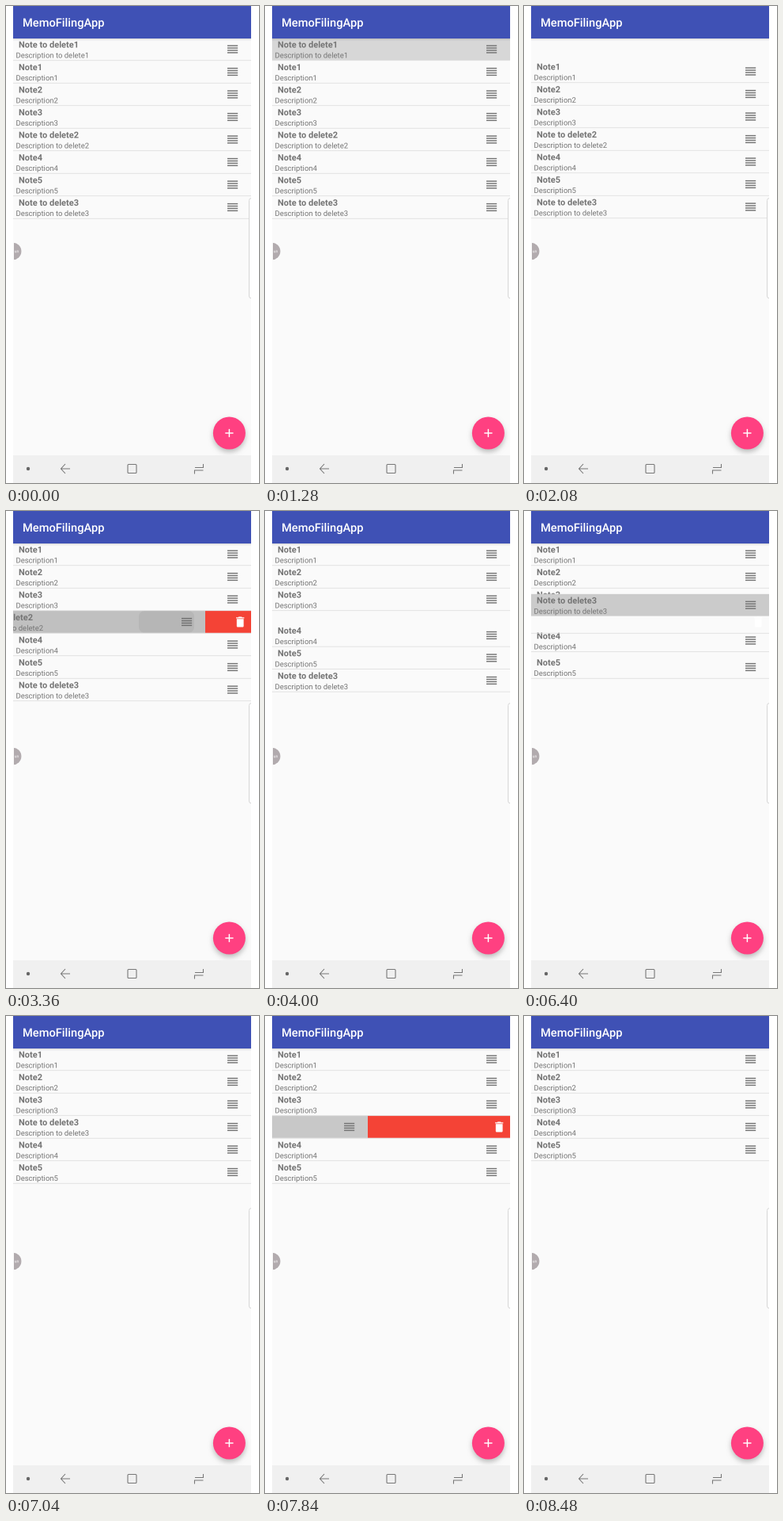
An HTML page with a canvas for the animation above (9.6 s loop, 320x602 px).

```html
<!DOCTYPE html>
<html lang="en">
<head>
<meta charset="utf-8">
<title>Note list</title>
<style>
html, body { margin: 0; width: 100%; height: 100%; overflow: hidden; background: #fff; }
canvas { display: block; width: 320px; height: 602px; }
</style>
</head>
<body>
<canvas id="stage"></canvas>
<script>
const W = 320, H = 602, LOOP = 9600, STEP = 160;
const LEFT = 9, RIGHT = 310, BAR = 41, TOP = 40.6, ROW = 28.5, DP = 0.7324;
const GRAY = '#757575', LINE = '#dadada', PAPER = '#fafafa';

const canvas = document.getElementById('stage');
const ctx = canvas.getContext('2d');
const dpr = window.devicePixelRatio || 1;
canvas.width = W * dpr;
canvas.height = H * dpr;
ctx.textRendering = 'geometricPrecision';

const trash = new Path2D('M6 19c0 1.1.9 2 2 2h8c1.1 0 2-.9 2-2V7H6zM19 4h-3.5l-1-1h-5l-1 1H5v2h14z');
const navIcons = new Path2D('M81 584H69.5M75 578L69.5 584L75 590' +
  'M155 578.5H164Q165 578.5 165 579.5V588.5Q165 589.5 164 589.5H155Q154 589.5 154 588.5V579.5Q154 578.5 155 578.5Z' +
  'M249.5 578V582.5H239M238.5 590.5V586H249.5');

// Linear interpolation through [time, value] pairs
function track(t, keys) {
  if (t <= keys[0][0]) return keys[0][1];
  for (let i = 1; i < keys.length; i++) {
    const [t0, a] = keys[i - 1], [t1, b] = keys[i];
    if (t < t1) return a + (b - a) * (t - t0) / (t1 - t0);
  }
  return keys[keys.length - 1][1];
}

// Accelerate-decelerate progress
function ease(t, start, length = 250) {
  const p = Math.min(1, Math.max(0, (t - start) / length));
  return (1 - Math.cos(Math.PI * p)) / 2;
}

const removals = {
  1: { press: 1120, gone: 1920, close: 2059,
       shade: [[1120, .03], [1280, .14], [1440, .2]],
       slide: [[1280, 0], [1440, 22], [1600, 75], [1760, 185], [1920, 301]] },
  2: { press: 3360, gone: 3680, close: 3890,
       shade: [[3360, .23]],
       slide: [[3360, 58], [3520, 205], [3680, 301]], ripple: true },
  3: { press: 7520, gone: 8000, close: 8200,
       shade: [[7520, .06], [7680, .2]],
       slide: [[7520, 0], [7680, 45], [7840, 180], [8000, 301]] }
};

const drag = {
  start: 5600, end: 7040, swap5: 6100, swap4: 6219,
  shade: [[5600, .03], [5760, .12], [5920, .19], [6720, .19], [6880, .08], [7040, 0]],
  y: [[5760, 183.1], [5920, 178], [6080, 158], [6240, 122], [6400, 104.8],
      [6560, 103], [6720, 106], [6880, 118], [7040, 126.1]]
};

function rect(x, y, w, h, color) {
  ctx.fillStyle = color;
  ctx.fillRect(x, y, w, h);
}

// The tiny skew keeps baselines from snapping to whole pixels
function text(str, x, y, font, color) {
  ctx.save();
  ctx.translate(x, y);
  ctx.transform(1, .001, 0, 1, 0, 0);
  ctx.font = font + ' Roboto, sans-serif';
  ctx.fillStyle = color;
  ctx.fillText(str, 0, 0);
  ctx.restore();
}

function disc(x, y, r, color) {
  ctx.fillStyle = color;
  ctx.beginPath();
  ctx.arc(x, y, r, 0, Math.PI * 2);
  ctx.fill();
}

function drawTrash(y) {
  ctx.save();
  ctx.translate(296.2 - 12 * DP, y + 13.9 - 12 * DP);
  ctx.scale(DP, DP);
  ctx.fillStyle = '#fff';
  ctx.fill(trash);
  ctx.restore();
}

function divider(y) {
  rect(LEFT, y + ROW - DP, RIGHT - LEFT, DP, LINE);
}

function drawRow(title, desc, y, dx = 0, shade = 0) {
  if (shade) {
    rect(LEFT + dx, y, RIGHT - LEFT, ROW - DP, PAPER);
    rect(LEFT + dx, y, RIGHT - LEFT, ROW - DP, `rgba(0,0,0,${shade})`);
  }
  text(title, 16.1 + dx, y + 11.8, 'bold 11px', GRAY);
  text(desc, 12.4 + dx, y + 24.9, '9.52px', GRAY);
  for (let i = 0; i < 4; i++) {
    rect(280 + dx, y + 13.9 + (4 * i - 7) * DP, 18 * DP, 2 * DP, GRAY);
  }
}

function drawNote(n, y) {
  drawRow('Note' + n, 'Description' + n, y);
  divider(y);
}

function drawDoomed(n, y, t) {
  const r = removals[n];
  const title = 'Note to delete' + n, desc = 'Description to delete' + n;
  if (t >= r.gone) return;
  if (t < r.press) {
    drawRow(title, desc, y);
    divider(y);
    return;
  }
  const dx = -track(t, r.slide);
  if (dx) {
    rect(RIGHT + dx, y, -dx, ROW - DP, '#f44336');
    drawTrash(y);
  }
  drawRow(title, desc, y, dx, track(t, r.shade));
  if (r.ripple) {
    ctx.fillStyle = 'rgba(0,0,0,.05)';
    ctx.beginPath();
    ctx.roundRect(226 + dx, y, 70, ROW - DP, 7);
    ctx.fill();
  }
  divider(y);
}

function drawList(t) {
  const size = n => ROW * (1 - ease(t, removals[n].close));
  const p5 = ease(t, drag.swap5), p4 = ease(t, drag.swap4);
  let y = TOP;

  drawDoomed(1, y, t);
  y += size(1);
  for (let n = 1; n <= 3; n++, y += ROW) drawNote(n, y);
  drawDoomed(2, y, t);
  y += size(2);

  const last = size(3);
  drawNote(4, y + last * p4);
  drawNote(5, y + ROW + last * p5);
  const slot = y + ROW * ((t < drag.swap4) + (t < drag.swap5));
  if (t >= drag.start && t < drag.end) {
    divider(slot);
    drawTrash(slot);
    drawRow('Note to delete3', 'Description to delete3', track(t, drag.y), 0, track(t, drag.shade));
  } else {
    drawDoomed(3, slot, t);
  }
}

function drawToolbar() {
  const g = ctx.createLinearGradient(0, BAR, 0, BAR + 3);
  g.addColorStop(0, 'rgba(0,0,0,.13)');
  g.addColorStop(1, 'rgba(0,0,0,0)');
  rect(LEFT, BAR, RIGHT - LEFT, 3, g);
  rect(LEFT, 0, RIGHT - LEFT, BAR, '#3f51b5');
  text('MemoFilingApp', 21, 26, '500 14.65px', '#fff');
}

function drawOverlays() {
  // Edge panel
  ctx.beginPath();
  ctx.roundRect(307.5, 242.5, 12, 126.5, 3);
  ctx.fillStyle = '#fdfdfd';
  ctx.fill();
  ctx.lineWidth = 1;
  ctx.strokeStyle = '#d6d6d6';
  ctx.stroke();

  // Floating bubble, a pixel off the screen edge
  disc(8.6, 309.5, 10.8, '#b2abae');
  rect(LEFT, 298, 1, 23, PAPER);
  text('un', 10.8, 311.3, '5px', '#fff');

  // Add button
  const x = 282.4, y = 539;
  ctx.save();
  ctx.shadowColor = 'rgba(0,0,0,.25)';
  ctx.shadowBlur = 6 * dpr;
  ctx.shadowOffsetY = 3.5 * dpr;
  disc(x, y, 20.5, '#ff4081');
  ctx.restore();
  rect(x - 7 * DP, y - DP, 14 * DP, 2 * DP, '#fff');
  rect(x - DP, y - 7 * DP, 2 * DP, 14 * DP, '#fff');
}

function drawNavBar() {
  rect(LEFT, 567, RIGHT - LEFT, H - 567, '#f0f0f0');
  disc(28, 584, 2.2, '#666');
  ctx.strokeStyle = '#777';
  ctx.lineWidth = 1.1;
  ctx.stroke(navIcons);
}

function draw(t) {
  ctx.setTransform(dpr, 0, 0, dpr, 0, 0);
  rect(0, 0, W, H, '#fff');
  ctx.save();
  ctx.beginPath();
  ctx.rect(LEFT, 0, RIGHT - LEFT, H);
  ctx.clip();
  rect(LEFT, 0, RIGHT - LEFT, H, PAPER);
  drawList(t);
  drawToolbar();
  drawOverlays();
  drawNavBar();
  ctx.restore();
}

const begin = performance.now();
function tick() {
  const t = (performance.now() - begin) % LOOP;
  draw(Math.floor(t / STEP) * STEP);
  requestAnimationFrame(tick);
}
tick();
</script>
</body>
</html>
```
